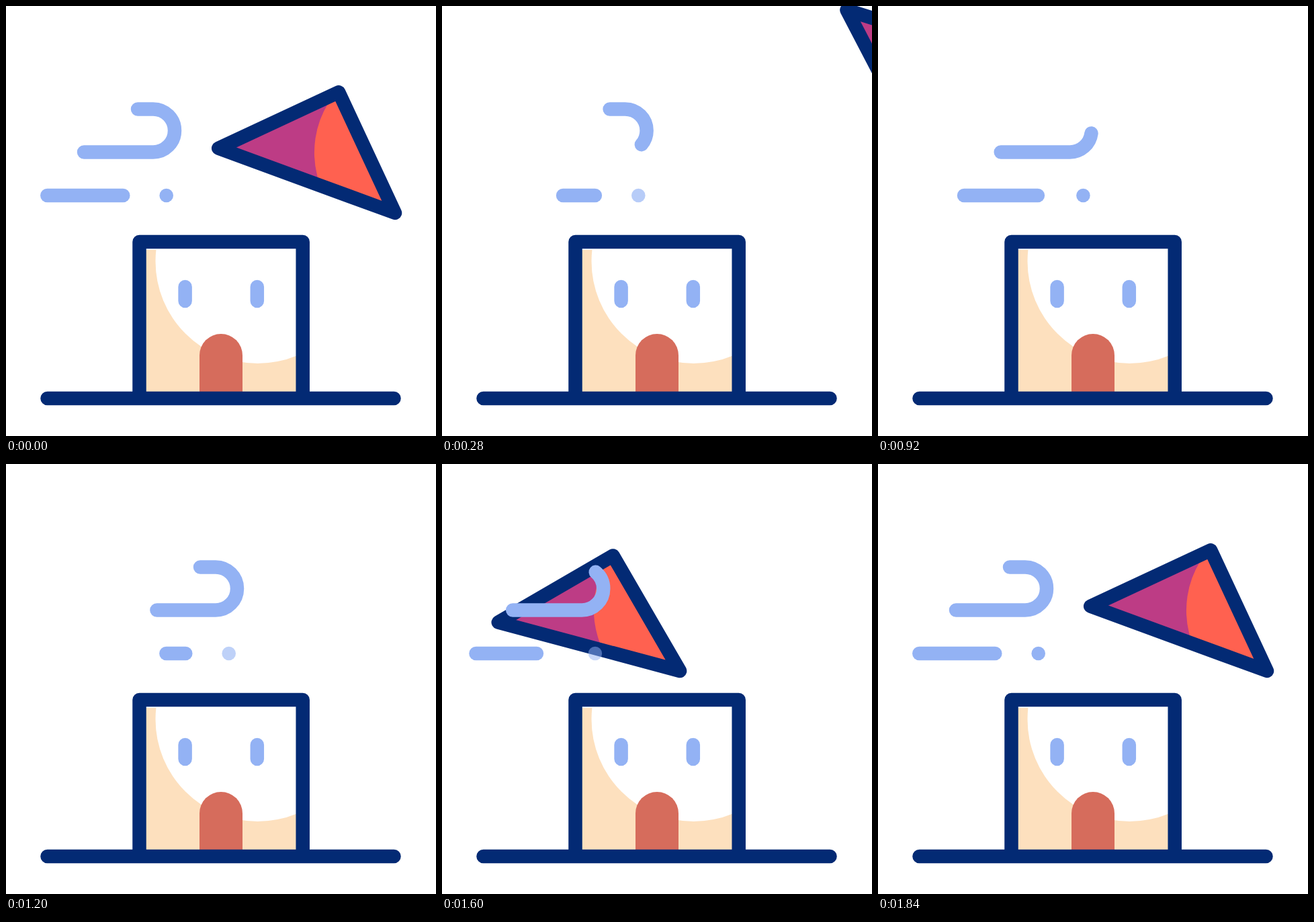
Animation, 640 px wide and 640 px high, one loop 2 s. Source, as an HTML page:

```html
<!DOCTYPE html>
<html lang="en">
<head>
<meta charset="utf-8">
<title>Windy house</title>
<style>
  html, body { margin: 0; width: 100%; height: 100%; overflow: hidden; background: #fff; }
  svg { display: block; width: 100vw; height: 100vh; }
  .line { fill: none; stroke-width: 20.5; stroke-linecap: round; stroke-linejoin: round; }
  .navy { stroke: #032a74; }
  .blue { stroke: #93b2f4; }
</style>
</head>
<body>
<svg viewBox="0 0 640 640">
  <defs>
    <clipPath id="wall"><path d="M199 363H441V584H199Z"/></clipPath>
    <clipPath id="gable"><path d="M0 0V-198.3H-197.5Z"/></clipPath>
    <g id="gust">
      <path class="line blue curl" pathLength="1" d="M116 217.4H219A32 32 0 0 0 219 153.4H196"/>
      <path class="line blue dash" pathLength="1" d="M61.3 282H174.3"/>
      <circle class="dot" cx="238.7" cy="282" r="10.3" fill="#93b2f4"/>
    </g>
  </defs>

  <g clip-path="url(#wall)">
    <path d="M199 363H441V584H199Z" fill="#fde0be"/>
    <circle cx="374.5" cy="380" r="152" fill="#fff"/>
  </g>
  <path d="M288 580V520A32 32 0 0 1 352 520V580Z" fill="#d66c5c"/>
  <path class="line blue" d="M266.6 418V439M373.8 418V439"/>
  <path class="line navy" d="M198.5 584V351H441.7V584M61.5 584H577.5"/>

  <g id="roof">
    <g clip-path="url(#gable)">
      <path d="M0 0V-198.3H-197.5Z" fill="#bd3c85"/>
      <circle cx="57" cy="-72.7" r="141" fill="#ff6150"/>
    </g>
    <path class="line navy" d="M0 0V-198.3H-197.5Z"/>
  </g>
  <g id="winds"></g>
</svg>
<script>
const LOOP = 2000, STEP = 40;
const roof = document.getElementById('roof');
const winds = document.getElementById('winds');
const template = document.getElementById('gust');

function makeGust() {
  const group = template.cloneNode(true);
  group.removeAttribute('id');
  winds.append(group);
  const part = name => group.querySelector('.' + name);
  return { group, curl: part('curl'), dash: part('dash'), dot: part('dot') };
}
const mainGust = makeGust(), secondGust = makeGust();

const clamp = x => Math.min(1, Math.max(0, x));

// cubic-bezier(.5, 0, .5, 1)
function ease(x) {
  let low = 0, high = 1;
  for (let i = 0; i < 24; i++) {
    const m = (low + high) / 2;
    if (m * m * m + 1.5 * m * (1 - m) < x) low = m; else high = m;
  }
  const s = (low + high) / 2;
  return s * s * (3 - 2 * s);
}
const tween = (t, from, to) => {
  const x = clamp((t - from) / (to - from));
  return x === 0 || x === 1 ? x : ease(x);
};
const ramp = (t, from, to) => clamp((t - from) / (to - from));

function trim(path, start, end) {
  const length = end - start;
  path.style.display = length > 0.0005 ? '' : 'none';
  path.setAttribute('stroke-dasharray', `${length} 2`);
  path.setAttribute('stroke-dashoffset', -start);
}

function drawGust(gust, shift, curl, dash, dotOpacity) {
  gust.group.setAttribute('transform', `translate(${shift} 0)`);
  trim(gust.curl, ...curl);
  trim(gust.dash, ...dash);
  gust.dot.setAttribute('opacity', dotOpacity);
}

function drawRoof(t) {
  let x, y = 308, angle;
  if (t < 600) {
    const e = tween(t, 0, 520);
    x = 579 + 265 * e;
    y += e * (277 * e - 253);
    angle = 25 - 73.5 * e;
  } else {
    const left = 110 * Math.pow(Math.max(0, 1840 - t) / 160, 1.764);
    x = 579 - left;
    angle = 25 + 0.0228 * left;
  }
  roof.style.display = t >= 520 && t < 1360 ? 'none' : '';
  roof.setAttribute('transform', `translate(${x} ${y}) rotate(${-angle})`);
}

function draw(t) {
  drawRoof(t);

  if (t < 1000) {
    const out = tween(t, 0, 520);
    drawGust(mainGust, 93 * out, [out, 1], [out, 1], 1 - ramp(t, 200, 440));
  } else {
    const grow = tween(t, 1284, 1756);
    drawGust(mainGust, -54 * (1 - grow), [0, grow], [0, grow], ramp(t, 1500, 1700));
  }

  drawGust(
    secondGust,
    93 * tween(t, 600, 1120),
    [tween(t, 1120, 1510), tween(t, 600, 1150)],
    [tween(t, 960, 1340), tween(t, 600, 970)],
    ramp(t, 680, 860) * (1 - ramp(t, 1120, 1320))
  );
}

const begin = performance.now();
function tick() {
  const t = (performance.now() - begin) % LOOP;
  draw(Math.floor(t / STEP) * STEP);
  requestAnimationFrame(tick);
}
tick();
</script>
</body>
</html>
```
